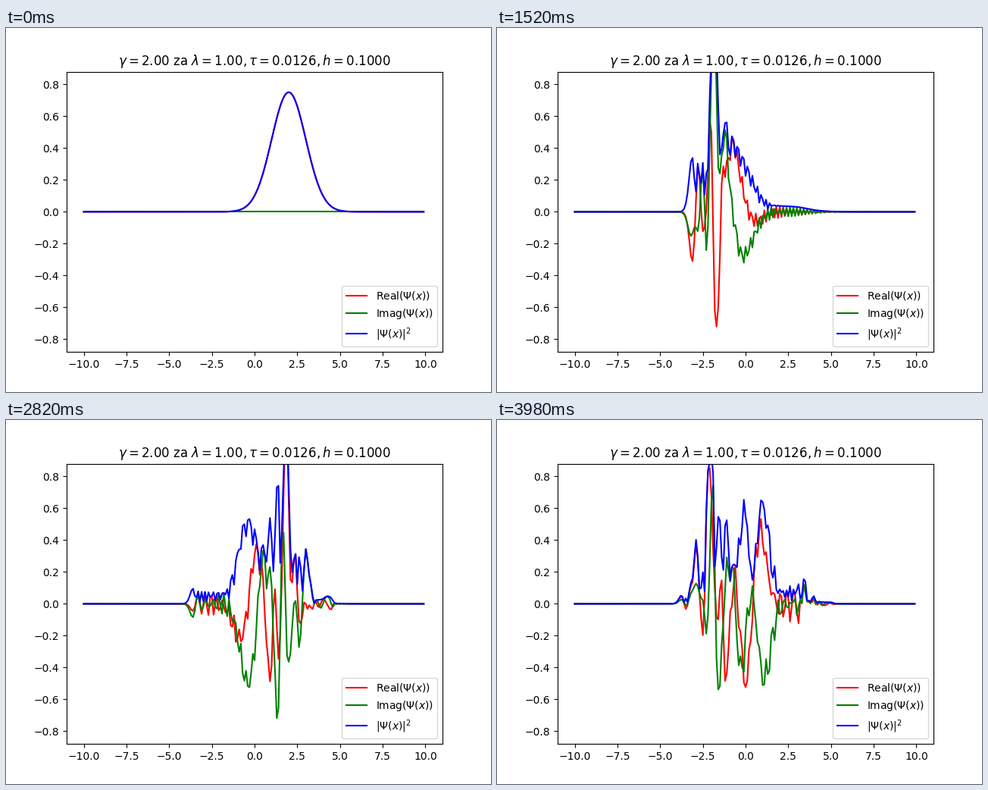
These frames come from a looping animation (640 px wide and 480 px high, 4 s). A matplotlib script:

```python
import numpy as np
import matplotlib.pyplot as plt
from matplotlib.animation import FuncAnimation

plt.rcParams["font.family"] = "DejaVu Sans"

FRAMES, INTERVAL = 200, 20
GAMMA, LAM = 2.0, 1.0
H, TAU = 0.1, 2 * np.pi / 500
STENCIL = [-5 / 2, 4 / 3, -1 / 12]  # fourth-order second derivative

x = -10 + H * np.arange(200)


def hamiltonian():
    """Anharmonic oscillator on the grid, five-point Laplacian."""
    n = len(x)
    laplacian = STENCIL[0] * np.eye(n)
    for k, c in enumerate(STENCIL[1:], 1):
        laplacian += c * (np.eye(n, k=k) + np.eye(n, k=-k))
    return np.diag(x**2 / 2 + LAM * x**4) - laplacian / (2 * H**2)


def evolve():
    """Crank-Nicolson evolution of a displaced ground state."""
    half = 0.5j * TAU * hamiltonian()
    one = np.eye(len(x))
    step = np.linalg.solve(one + half, one - half)
    psi = np.pi**-0.25 * np.exp(-((x - GAMMA) ** 2) / 2) + 0j
    states = [psi]
    for _ in range(FRAMES - 1):
        psi = step @ psi
        states.append(psi)
    return states


states = evolve()

fig, ax = plt.subplots(figsize=(6.4, 4.8), dpi=100)
ax.set_xlim(-11, 11)
ax.set_ylim(-0.88, 0.88)
ax.set_title(
    rf"$\gamma = {GAMMA:.2f}$ za $\lambda = {LAM:.2f}, "
    rf"\tau = {TAU:.4f}, h = {H:.4f}$"
)

parts = [
    (np.real, "red", r"Real($\Psi(x)$)"),
    (np.imag, "green", r"Imag($\Psi(x)$)"),
    (np.abs, "blue", r"$|\Psi(x)|^2$"),
]
lines = [
    ax.plot(x, part(states[0]), color=color, label=label)[0]
    for part, color, label in parts
]
ax.legend(loc="lower right")


def update(i):
    for line, (part, _, _) in zip(lines, parts):
        line.set_ydata(part(states[i]))
    return lines


anim = FuncAnimation(fig, update, frames=FRAMES, interval=INTERVAL,
                     repeat=True, repeat_delay=0)
plt.show()
```
